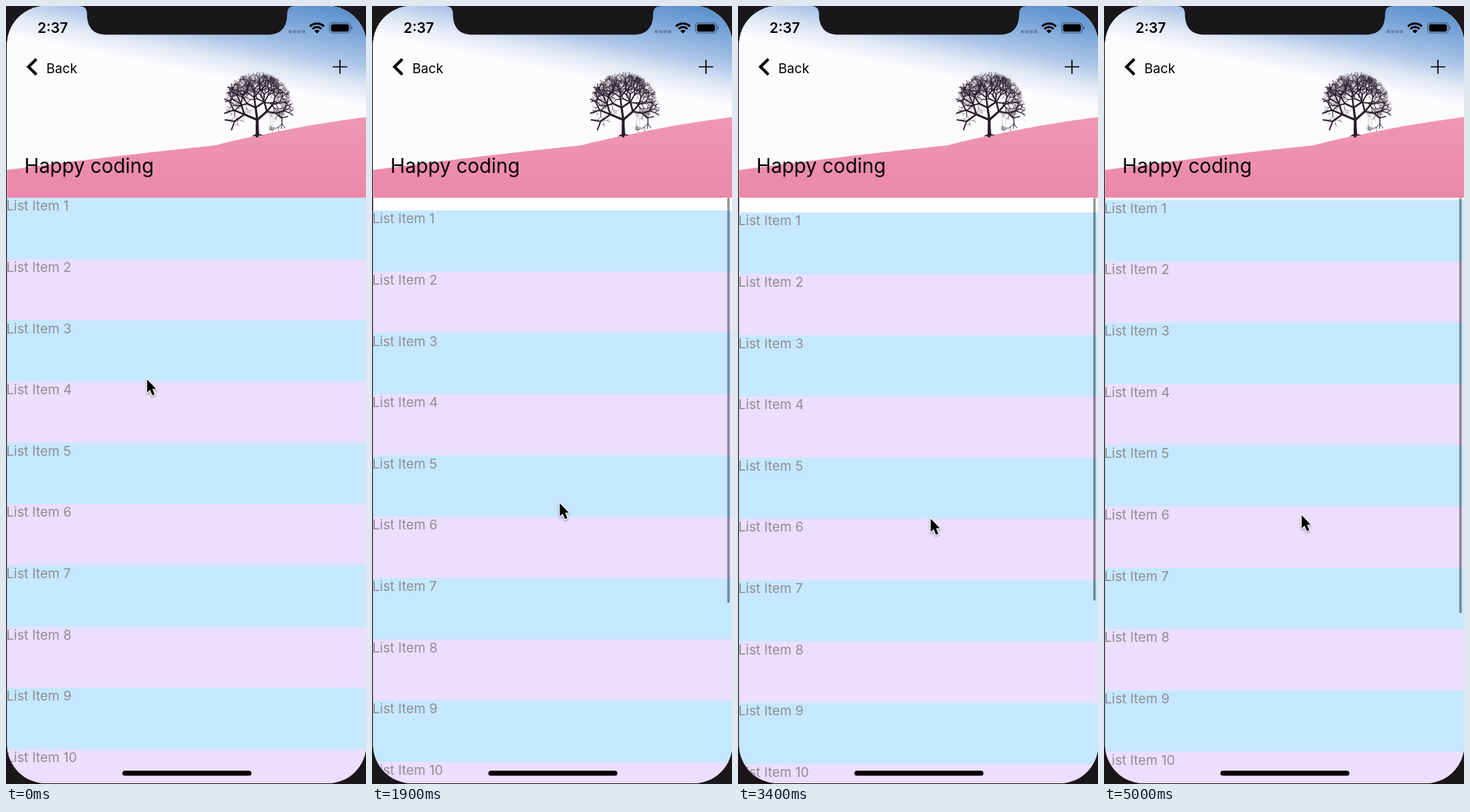
Recreate the animation shown at these times as an HTML page with a canvas. Size 509 px wide and 1100 px high, loop 5.1 s.

```html
<!DOCTYPE html>
<html lang="en">
<head>
<meta charset="utf-8">
<title>Collapsing header</title>
<style>
  html, body { margin: 0; width: 100%; height: 100%; overflow: hidden; background: #19171a; }
  canvas { display: block; width: 509px; height: 1100px; }
</style>
</head>
<body>
<canvas id="stage" width="509" height="1100"></canvas>
<script>
const W = 509, H = 1100, LOOP = 5100, STEP = 100;
const MAX_HEAD = 271, MIN_HEAD = 119, ROW = 86.65, ROWS = 13, MAX_SCROLL = 297;
const FONT = 'Inter, "Liberation Sans", sans-serif';
const ctx = document.getElementById('stage').getContext('2d');

// time, scroll offset, pointer x, pointer y
const KEYS = [
  [0, 0, 199, 528],
  [400, 0, 262, 613],
  [900, 134.5, 267, 479],
  [1200, 210, 268, 405],
  [1900, -18, 265, 703],
  [2700, 331.4, 272, 301],
  [3400, -21, 272, 725],
  [3900, 0, 272, 866],
  [4400, 106, 272, 760],
  [4650, -14, 275, 872],
  [5000, -3.5, 279, 720]
];

const clamp = (v, a, b) => Math.max(a, Math.min(b, v));
const mix = (a, b, p) => a + (b - a) * p;

function slope(i, k) {
  if (i < 1) return 0;
  return (KEYS[i][k] - KEYS[i - 1][k]) / (KEYS[i][0] - KEYS[i - 1][0]);
}

function tangent(i, k) {
  if (i < 1 || i >= KEYS.length - 1) return 0;
  const a = slope(i, k), b = slope(i + 1, k);
  return a * b > 0 ? 2 * a * b / (a + b) : 0;
}

// Monotone cubic through the keys
function sample(t, k) {
  t = clamp(t, 0, KEYS[KEYS.length - 1][0]);
  let i = 0;
  while (i < KEYS.length - 2 && t > KEYS[i + 1][0]) i++;
  const a = KEYS[i], b = KEYS[i + 1], d = b[0] - a[0];
  const u = (t - a[0]) / d, v = u * u * (3 - 2 * u);
  return mix(a[k], b[k], v)
    + d * u * (1 - u) * ((1 - u) * tangent(i, k) - u * tangent(i + 1, k));
}

function randomizer(seed) {
  return () => (seed = (seed * 16807) % 2147483647) / 2147483647;
}

function poly(c, points) {
  c.beginPath();
  points.forEach(([x, y], i) => i ? c.lineTo(x, y) : c.moveTo(x, y));
}

function drawTree(c) {
  const rnd = randomizer(4127);
  const inCrown = (x, y) => ((x - 357) / 45) ** 2 + ((y - 139) / 42) ** 2 < 1;
  c.strokeStyle = '#261d2c';
  c.lineCap = 'round';
  function branch(x, y, angle, len, depth) {
    const ex = x + Math.cos(angle) * len, ey = y + Math.sin(angle) * len;
    c.lineWidth = 0.45 + 0.055 * depth * depth;
    c.globalAlpha = depth < 3 ? 0.75 : 1;
    c.beginPath();
    c.moveTo(x, y);
    c.lineTo(ex, ey);
    c.stroke();
    if (!depth || (depth < 7 && !inCrown(ex, ey))) return;
    const n = depth > 6 || rnd() < 0.3 ? 3 : 2;
    for (let i = 0; i < n; i++) {
      const turn = (i / (n - 1) - 0.5) * (depth > 6 ? 1.9 : 1.35) + (rnd() - 0.5) * 0.5;
      branch(ex, ey, angle + turn, len * (0.72 + rnd() * 0.16), depth - 1);
    }
  }
  branch(355, 184, -1.56, 23, 8);
  c.globalAlpha = 1;
  c.fillStyle = '#261d2c';
  poly(c, [[347, 184.5], [353, 181], [353.5, 168], [357, 168], [358, 181], [364, 182.5]]);
  c.fill();
  c.globalAlpha = 0.3;
  c.lineWidth = 0.6;
  for (const x of [374, 378]) {
    poly(c, [[x, 150], [x, 174]]);
    c.stroke();
  }
  c.globalAlpha = 0.7;
  c.lineWidth = 1.2;
  poly(c, [[373.5, 174.5], [378, 174.5]]);
  c.stroke();
  c.globalAlpha = 1;
}

function makePhoto() {
  const cv = document.createElement('canvas');
  cv.width = W;
  cv.height = MAX_HEAD;
  const c = cv.getContext('2d');
  const sky = c.createLinearGradient(509, 0, 481.7, 136.5);
  [[0, '#4f88c6'], [0.3, '#7ba6d9'], [0.6, '#adc6e8'], [0.8, '#dfe7f5'], [1, '#fdfbfd']]
    .forEach(([p, color]) => sky.addColorStop(p, color));
  c.fillStyle = sky;
  c.fillRect(0, 0, W, MAX_HEAD);

  const hill = c.createLinearGradient(0, 160, 0, 271);
  hill.addColorStop(0, '#ee97b2');
  hill.addColorStop(1, '#eb88a8');
  c.fillStyle = hill;
  c.beginPath();
  c.moveTo(0, 232);
  c.quadraticCurveTo(150, 212, 296, 197);
  c.quadraticCurveTo(330, 188, 358, 183);
  c.quadraticCurveTo(430, 167, 509, 157);
  c.lineTo(509, 271);
  c.lineTo(0, 271);
  c.fill();
  drawTree(c);
  return cv;
}

const photo = makePhoto();

function text(str, x, y, size, color, weight = 400) {
  ctx.font = `${weight} ${size}px ${FONT}`;
  ctx.fillStyle = color;
  ctx.fillText(str, x, y);
}

function pill(x, y, w, h, r, color) {
  ctx.fillStyle = color;
  ctx.beginPath();
  ctx.roundRect(x, y, w, h, r);
  ctx.fill();
}

function drawList(scroll) {
  const top = MAX_HEAD - scroll;
  for (let i = 0; i < ROWS; i++) {
    const y = top + i * ROW;
    ctx.fillStyle = i % 2 ? '#ebdefe' : '#c5e8ff';
    ctx.fillRect(0, y, W, ROW + (i < ROWS - 1 ? 1 : 0));
  }
  for (let i = 0; i < ROWS; i++) {
    text('List Item ' + (i + 1), 0.5, top + i * ROW + 18.2, 18.8, '#8e8d93');
  }
}

function drawHeader(head) {
  const p = (MAX_HEAD - head) / (MAX_HEAD - MIN_HEAD);
  ctx.save();
  ctx.beginPath();
  ctx.rect(0, 0, W, head);
  ctx.clip();
  ctx.fillStyle = '#fefdff';
  ctx.fillRect(0, 0, W, head);
  ctx.globalAlpha = 1 - p;
  ctx.drawImage(photo, 0, (head - MAX_HEAD) / 2);
  ctx.restore();

  ctx.globalAlpha = (1 - p) ** 2;
  text('Back', 57, 94.5, 18.8, '#000');
  ctx.globalAlpha = 1;
  text('Happy coding', mix(26, 56.5, p), mix(236, 94.5, p), mix(27.8, 18.7, p), '#000');

  ctx.strokeStyle = '#000';
  ctx.lineCap = 'butt';
  ctx.lineWidth = 4;
  poly(ctx, [[43, 75], [31.8, 86], [43, 97]]);
  ctx.stroke();
  ctx.lineWidth = 1.7;
  poly(ctx, [[462, 86], [482.5, 86]]);
  ctx.stroke();
  poly(ctx, [[472.2, 76], [472.2, 96]]);
  ctx.stroke();
}

function drawStatus() {
  text('2:37', 44.5, 38, 20, '#000', 600);
  for (let i = 0; i < 4; i++) pill(399.5 + i * 6.3, 34, 4.7, 4.5, 1.3, 'rgba(0,0,0,.25)');

  const cx = 439.7, cy = 38.8, a = -Math.PI * 0.75, b = -Math.PI * 0.25;
  ctx.lineWidth = 3;
  for (const r of [14, 9]) {
    ctx.beginPath();
    ctx.arc(cx, cy, r, a, b);
    ctx.stroke();
  }
  ctx.fillStyle = '#000';
  ctx.beginPath();
  ctx.moveTo(cx, cy);
  ctx.arc(cx, cy, 5.3, a, b);
  ctx.fill();

  ctx.strokeStyle = 'rgba(0,0,0,.42)';
  ctx.lineWidth = 1.3;
  ctx.beginPath();
  ctx.roundRect(457.6, 23.8, 29.2, 14.4, 4);
  ctx.stroke();
  pill(459.6, 25.8, 25.2, 10.4, 2.4, '#000');
  pill(488.3, 28.6, 1.8, 4.8, [0, 2, 2, 0], 'rgba(0,0,0,.42)');
}

function drawBar(scroll, head, t) {
  const alpha = clamp((t - 400) / 100, 0, 1);
  if (!alpha) return;
  const over = Math.max(0, scroll - MAX_SCROLL);
  const inside = Math.min(scroll, MAX_SCROLL);
  const top = head + 0.8 * Math.max(0, inside - 152) + over;
  const bottom = 862 + (inside < 0 ? inside : inside * 0.785);
  ctx.globalAlpha = alpha;
  pill(502.3, top, 3.4, bottom - top, 1.7, 'rgba(0,0,0,.42)');
  ctx.globalAlpha = 1;
}

function drawNotch() {
  ctx.fillStyle = '#19171a';
  ctx.beginPath();
  ctx.moveTo(103, 0);
  ctx.quadraticCurveTo(114.5, 0, 114.5, 11);
  ctx.bezierCurveTo(114.5, 31, 124, 40.5, 142, 40.5);
  ctx.lineTo(370, 40.5);
  ctx.bezierCurveTo(388, 40.5, 397.5, 31, 397.5, 11);
  ctx.quadraticCurveTo(397.5, 0, 409, 0);
  ctx.fill();
}

function drawPointer(x, y) {
  ctx.save();
  ctx.translate(x, y);
  poly(ctx, [[0.5, 0], [0.5, 18.5], [4.6, 14.8], [7.9, 22.4], [11.3, 20.9], [8, 13.5], [13.3, 13.2]]);
  ctx.closePath();
  ctx.lineJoin = 'round';
  ctx.shadowColor = 'rgba(0,0,0,.35)';
  ctx.shadowBlur = 3;
  ctx.shadowOffsetY = 1.5;
  ctx.strokeStyle = '#fff';
  ctx.lineWidth = 2.6;
  ctx.stroke();
  ctx.shadowColor = 'transparent';
  ctx.fillStyle = '#000';
  ctx.fill();
  ctx.restore();
}

function draw(t) {
  const scroll = sample(t, 1);
  // The header trails the list slightly
  const head = clamp(MAX_HEAD - sample(t - 25, 1), MIN_HEAD, MAX_HEAD);
  ctx.fillStyle = '#19171a';
  ctx.fillRect(0, 0, W, H);
  ctx.save();
  ctx.beginPath();
  ctx.roundRect(1.5, 0, 508, 1099, 55);
  ctx.clip();
  ctx.fillStyle = '#fefeff';
  ctx.fillRect(0, 0, W, H);
  drawList(scroll);
  drawHeader(head);
  drawBar(scroll, head, t);
  drawStatus();
  pill(164.5, 1081.3, 182.5, 7, 3.5, '#000');
  ctx.restore();
  drawNotch();
  drawPointer(sample(t, 2), sample(t, 3));
}

const start = performance.now();
function tick(now) {
  const t = Math.max(0, now - start) % LOOP;
  draw(Math.floor(t / STEP) * STEP);
  requestAnimationFrame(tick);
}
draw(0);
requestAnimationFrame(tick);
</script>
</body>
</html>
```
